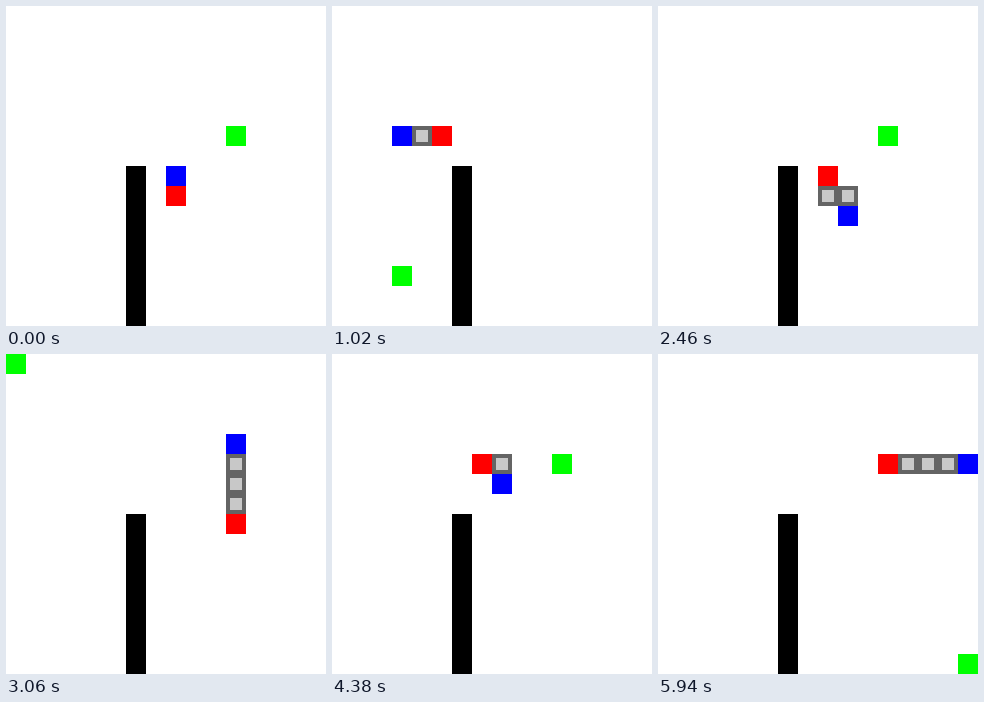
An HTML page with a canvas for the animation above (6 s loop, 320 by 320 pixels).

```html
<!DOCTYPE html>
<html lang="en">
<head>
<meta charset="utf-8">
<title>Snake</title>
<style>
  html, body { margin: 0; width: 100%; height: 100%; overflow: hidden; background: #fff; }
  canvas { display: block; }
</style>
</head>
<body>
<canvas id="stage" width="320" height="320"></canvas>
<script>
const CELL = 20, TICK = 60;
const ctx = document.getElementById('stage').getContext('2d');
const DIRS = { U: [0, -1], D: [0, 1], L: [-1, 0], R: [1, 0] };

// Each run: moves with optional repeat counts, and the food cells in order.
const runs = [
  { moves: 'RDRDRU4L8D7RDRU7R2DRDRDRDRU11L11',
    foods: [[11, 6], [3, 13], [11, 6], [0, 0], [7, 5]] },
  { moves: 'LU3RDRDRDRU4LUL4DRDR8',
    foods: [[7, 5], [11, 5], [6, 4], [15, 15]] }
];

function play({ moves, foods }) {
  let snake = [[8, 8], [8, 9]], eaten = 0;
  const states = [{ snake, food: foods[0] }];
  const steps = moves.replace(/([UDLR])(\d+)/g, (_, dir, count) => dir.repeat(count));
  for (const step of steps) {
    const [dx, dy] = DIRS[step];
    const head = [snake[0][0] + dx, snake[0][1] + dy];
    const ate = String(head) === String(foods[eaten]);
    if (ate) eaten++;
    snake = [head, ...(ate ? snake : snake.slice(0, -1))];
    states.push({ snake, food: foods[eaten] });
  }
  return states;
}

const timeline = runs.flatMap(play);

function fillCell([x, y], color, inset = 0) {
  ctx.fillStyle = color;
  ctx.fillRect(x * CELL + inset, y * CELL + inset, CELL - 2 * inset, CELL - 2 * inset);
}

function draw({ snake, food }) {
  ctx.fillStyle = '#fff';
  ctx.fillRect(0, 0, 320, 320);
  ctx.fillStyle = '#000';
  ctx.fillRect(120, 160, CELL, 160);
  fillCell(food, '#0f0');
  for (const part of snake.slice(1, -1)) {
    fillCell(part, '#646464');
    fillCell(part, '#c8c8c8', 4);
  }
  fillCell(snake[snake.length - 1], '#f00');
  fillCell(snake[0], '#00f');
}

const start = performance.now();
function loop() {
  const tick = Math.floor((performance.now() - start) / TICK);
  draw(timeline[tick % timeline.length]);
  requestAnimationFrame(loop);
}
loop();
</script>
</body>
</html>
```
